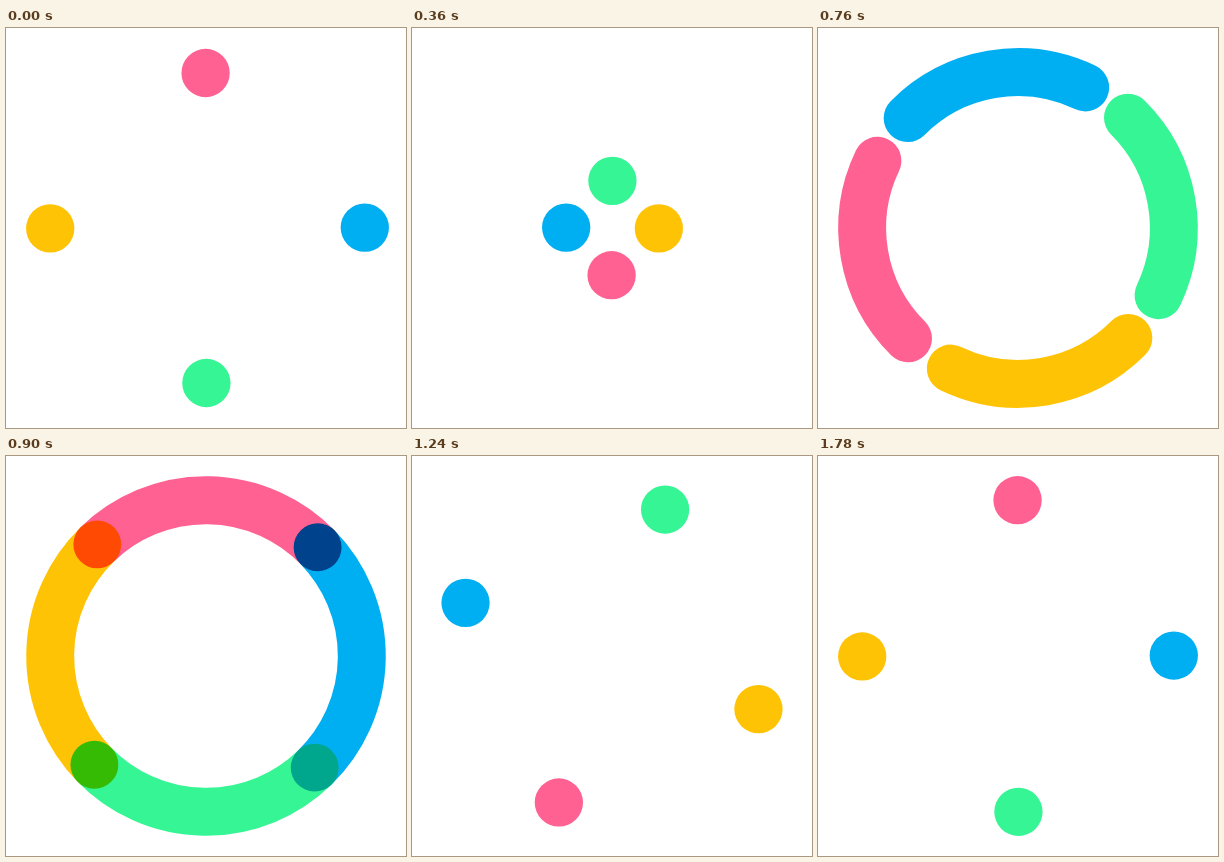
Animation of 400 by 400 pixels, one loop 1800 ms. Source, as an HTML page with a canvas:

```html
<!DOCTYPE html>
<html lang="en">
<head>
<meta charset="utf-8">
<title>Four dots loader</title>
<style>
  html, body { margin: 0; width: 100%; height: 100%; overflow: hidden; background: #fff; }
  canvas { display: block; width: 400px; height: 400px; }
</style>
</head>
<body>
<canvas id="stage" width="400" height="400"></canvas>
<script>
const ctx = document.getElementById('stage').getContext('2d');
const LOOP = 1800, PHASE = 600;
const MID = 200, RING = 155.8, DOT = 24.15;
const RAD = Math.PI / 180;

// from / to: ends of the straight crossing; angle: where the crossing ends on the ring
const dots = [
  { color: '#ffc305', from: [44.2, 200.4], to: [355.8, 200.4], angle: 0 },
  { color: '#ff6192', from: [199.6, 45], to: [199.6, 355.9], angle: 90 },
  { color: '#00aef2', from: [358.8, 199.6], to: [44.2, 199.6], angle: 180 },
  { color: '#35f595', from: [200.4, 355], to: [200.4, 44.2], angle: 270 }
];

const mix = (a, b, k) => a + (b - a) * k;
const smooth = u => u * u * (3 - 2 * u);
const headEase = u => u + u * u - u * u * u;
const tailEase = u => 2 * u * u - u * u * u;

function bezier(x1, y1, x2, y2) {
  const at = (a, b, s) => 3 * (1 - s) * (1 - s) * s * a + 3 * (1 - s) * s * s * b + s * s * s;
  return u => {
    let lo = 0, hi = 1;
    for (let i = 0; i < 30; i++) {
      const s = (lo + hi) / 2;
      if (at(x1, x2, s) < u) lo = s; else hi = s;
    }
    return at(y1, y2, (lo + hi) / 2);
  };
}
const spinEase = bezier(0.167, 0.24, 0.465, 1);

function disc(x, y, color) {
  ctx.fillStyle = color;
  ctx.beginPath();
  ctx.arc(x, y, DOT, 0, Math.PI * 2);
  ctx.fill();
}

function ringDot(angle, color) {
  disc(MID + RING * Math.cos(angle * RAD), MID + RING * Math.sin(angle * RAD), color);
}

function band(tail, head, color) {
  if (head - tail < 0.05) return ringDot(head, color);
  ctx.strokeStyle = color;
  ctx.beginPath();
  ctx.arc(MID, MID, RING, tail * RAD, head * RAD);
  ctx.stroke();
}

function draw(time) {
  const phase = Math.floor(time / PHASE);
  const u = time / PHASE - phase;

  ctx.globalCompositeOperation = 'source-over';
  ctx.fillStyle = '#fff';
  ctx.fillRect(0, 0, 400, 400);
  ctx.globalCompositeOperation = 'multiply';
  ctx.lineWidth = DOT * 2 - 0.4;
  ctx.lineCap = 'round';

  for (const { color, from, to, angle } of dots) {
    if (phase === 0 || (phase === 1 && u === 0)) {
      const k = phase ? 1 : smooth(u);
      disc(mix(from[0], to[0], k), mix(from[1], to[1], k), color);
    } else if (phase === 1) {
      band(angle + 360 * tailEase(u), angle + 360 * headEase(u), color);
    } else {
      ringDot(angle + 180 * spinEase(u), color);
    }
  }
}

const start = performance.now();
function tick() {
  draw((performance.now() - start) % LOOP);
  requestAnimationFrame(tick);
}
draw(0);
requestAnimationFrame(tick);
</script>
</body>
</html>
```
